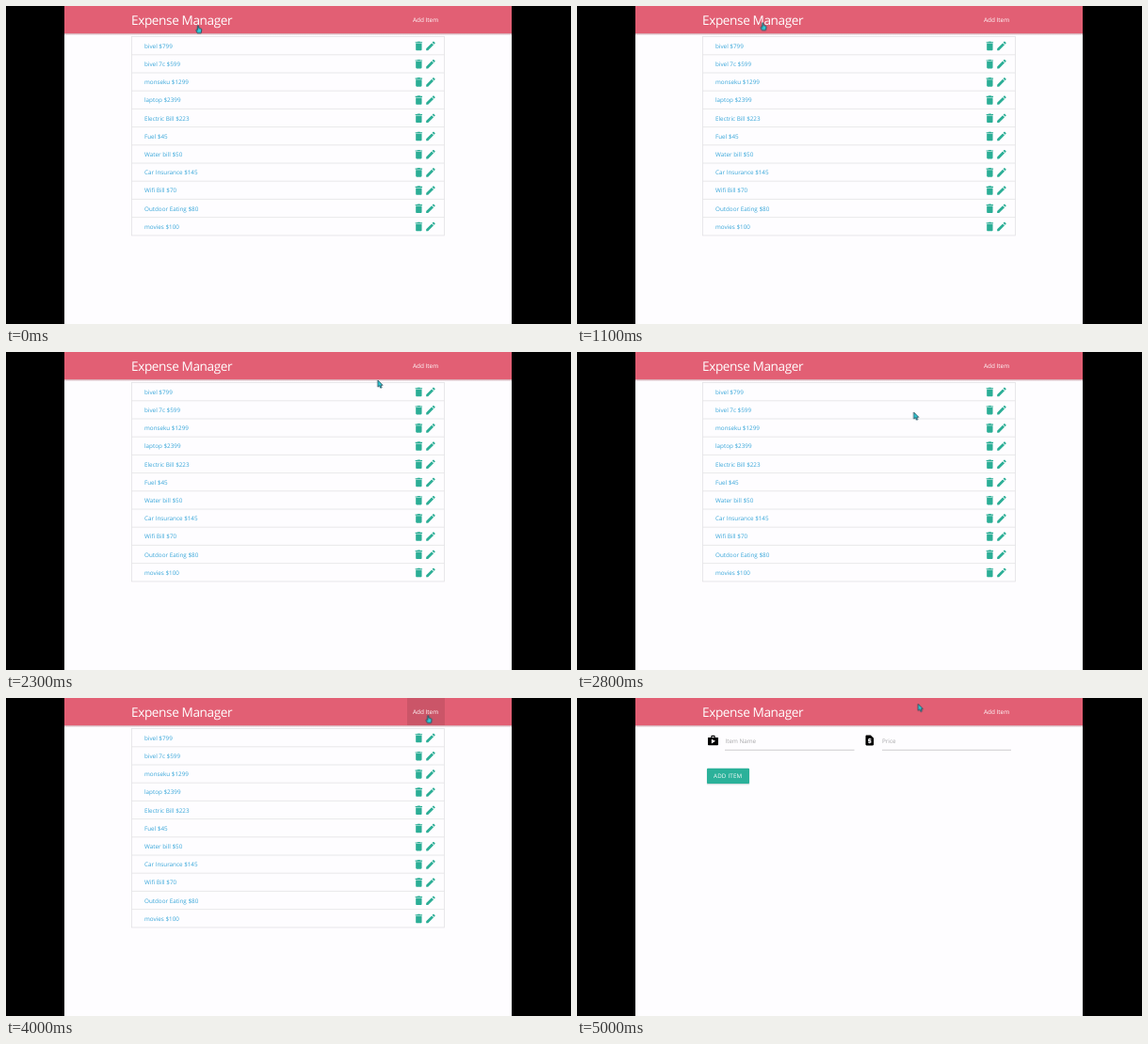
Recreate the animation shown at these times as an HTML page. Size 600 by 338 pixels, loop 5100 ms.

```html
<!DOCTYPE html>
<html lang="en">
<head>
<meta charset="utf-8">
<title>Expense Manager</title>
<style>
html, body { margin: 0; width: 100%; height: 100%; overflow: hidden; background: #000; }
svg { display: block; }
#stage { width: 100vw; height: 100vh; }
text { font: 6.3px "Open Sans", "Noto Sans", sans-serif; text-rendering: geometricPrecision; }
.brand { font-size: 13.6px; letter-spacing: -.39px; fill: #fff; }
.link { font-size: 6.4px; fill: #fff; }
.item { fill: #37a6d9; }
.hint { fill: #a6a6a8; }
.btn { font-size: 6.2px; letter-spacing: .21px; fill: #fff; }
.icon { fill: #2bae96; }
.rule { stroke: #e3e2e5; stroke-width: .8; fill: none; }
.field { stroke: #b9b8bb; stroke-width: .7; }

/* 5.1 s loop; the picture moves in 100 ms steps */
#list, #form, #hover, #hand, #arrow, #pointer { animation: 5.1s infinite step-end; }
#list { animation-name: list; }
#form { animation-name: form; }
#hover { animation-name: hover; }
#hand { animation-name: hand; }
#arrow { animation-name: arrow; }
#pointer { animation-name: move; }

@keyframes list { 0% { opacity: 1 } 86.26%, 100% { opacity: 0 } }
@keyframes form { 0% { opacity: 0 } 86.26%, 100% { opacity: 1 } }
@keyframes hover { 0% { opacity: 0 } 66.65% { opacity: 1 } 86.26%, 100% { opacity: 0 } }
@keyframes hand {
  0% { opacity: 1 } 39.2% { opacity: 0 } 66.65% { opacity: 1 } 96.06%, 100% { opacity: 0 }
}
@keyframes arrow {
  0% { opacity: 0 } 39.2% { opacity: 1 } 66.65% { opacity: 0 } 96.06%, 100% { opacity: 1 }
}
@keyframes move {
  0% { transform: translate(204px, 20.5px); animation-timing-function: steps(4) }
  7.83% { transform: translate(197.3px, 17.5px) }
  37.24% { transform: translate(197.3px, 17.5px); animation-timing-function: steps(4) }
  45.08% { transform: translate(394.8px, 30px); animation-timing-function: steps(2) }
  49% { transform: translate(373px, 54px); animation-timing-function: steps(3) }
  54.88% { transform: translate(357.6px, 64px) }
  58.8% { transform: translate(357.6px, 64px); animation-timing-function: steps(4) }
  66.65% { transform: translate(439px, 22px); animation-timing-function: steps(2) }
  70.57% { transform: translate(447px, 17.5px) }
  78.41% { transform: translate(448.3px, 18.3px) }
  94.1% { transform: translate(448.3px, 18.3px); animation-timing-function: steps(2) }
  98.02%, 100% { transform: translate(362.2px, 6.3px) }
}
</style>
</head>
<body>
<svg id="stage" viewBox="0 0 600 338" preserveAspectRatio="none">
  <defs>
    <linearGradient id="shade" x2="0" y2="1">
      <stop stop-color="#c9929c"/>
      <stop offset="1" stop-color="#fefdff"/>
    </linearGradient>
    <path id="bin" d="M6 19c0 1.1.9 2 2 2h8c1.1 0 2-.9 2-2V7H6v12zM19 4h-3.5l-1-1h-5l-1 1H5v2h14V4z"/>
    <path id="pen" d="M3 17.25V21h3.75L17.81 9.94l-3.75-3.75L3 17.25zM20.71 7.04c.39-.39.39-1.02 0-1.41l-2.34-2.34c-.39-.39-1.02-.39-1.41 0l-1.83 1.83 3.75 3.75 1.83-1.83z"/>
  </defs>
  <rect x="62" width="475" height="338" fill="#fefdff"/>
  <rect x="62" y="28.8" width="475" height="2.4" fill="url(#shade)"/>
  <rect x="62" width="475" height="29" fill="#e25f74"/>
  <rect id="hover" x="426" width="40" height="29" fill="#cb5568"/>
  <text class="brand" x="133" y="20">Expense Manager</text>
  <text class="link" x="432" y="17">Add Item</text>

  <g id="list">
    <rect class="rule" x="133.5" y="32.6" width="332" height="211.3"/>
  </g>

  <g id="form">
    <path transform="translate(137.9 38.7) scale(.55)" d="M16 6V4c0-1.11-.89-2-2-2h-4c-1.11 0-2 .89-2 2v2H2v13c0 1.11.89 2 2 2h16c1.11 0 2-.89 2-2V6h-6zm-6-2h4v2h-4V4zM9 18V9l7.5 4L9 18z"/>
    <path transform="translate(304.3 38.5) scale(.54)" d="M14 2H6c-1.1 0-1.99.9-1.99 2L4 20c0 1.1.89 2 1.99 2H18c1.1 0 2-.9 2-2V8l-6-6zm1 9h-4v1h3c.55 0 1 .45 1 1v3c0 .55-.45 1-1 1h-1v1h-2v-1H9v-2h4v-1h-3c-.55 0-1-.45-1-1v-3c0-.55.45-1 1-1h1V8h2v1h2v2z"/>
    <text class="hint" x="157.5" y="48.3">Item Name</text>
    <text class="hint" x="324" y="48.3">Price</text>
    <path class="field" d="M157 55.3H294.5M324 55.3H461"/>
    <rect x="137.8" y="75.6" width="45.4" height="16.6" rx="1" fill="#d3dddd"/>
    <rect x="138" y="74.8" width="45" height="16.2" rx="1" fill="#2bb19a"/>
    <text class="btn" x="145" y="85.2">ADD ITEM</text>
  </g>

  <g id="pointer" fill="#2fcbd6" stroke="#1d4250" stroke-width=".8" stroke-linejoin="round">
    <path id="arrow" d="M0 0V7.2L1.7 5.8 2.9 8.3 4.2 7.7 3.1 5.3H5.2Z"/>
    <path id="hand" d="M-.7.7Q0-.4.7.7V3L3 3.5Q4 3.8 3.8 5L3.2 8.2H-.8L-2.4 5.2Q-2.3 4.2-.7 5.2Z"/>
  </g>
</svg>
<script>
const items = [
  "bivel $799", "bivel 7c $599", "monseku $1299", "laptop $2399",
  "Electric Bill $223", "Fuel $45", "Water bill $50", "Car Insurance $145",
  "Wifi Bill $70", "Outdoor Eating $80", "movies $100"
];
const step = 19.2;
const icon = (id, x) =>
  `<use href="#${id}" class="icon" transform="translate(${x} 3.5) scale(.53)"/>`;

document.getElementById("list").innerHTML += items.map((label, i) =>
  `<g transform="translate(0 ${32.6 + i * step})">
    ${i ? '<path class="rule" d="M133.5 0H465.5"/>' : ""}
    <text class="item" x="147" y="12.2">${label}</text>
    ${icon("bin", 432)}${icon("pen", 444.6)}
  </g>`).join("");
</script>
</body>
</html>
```
